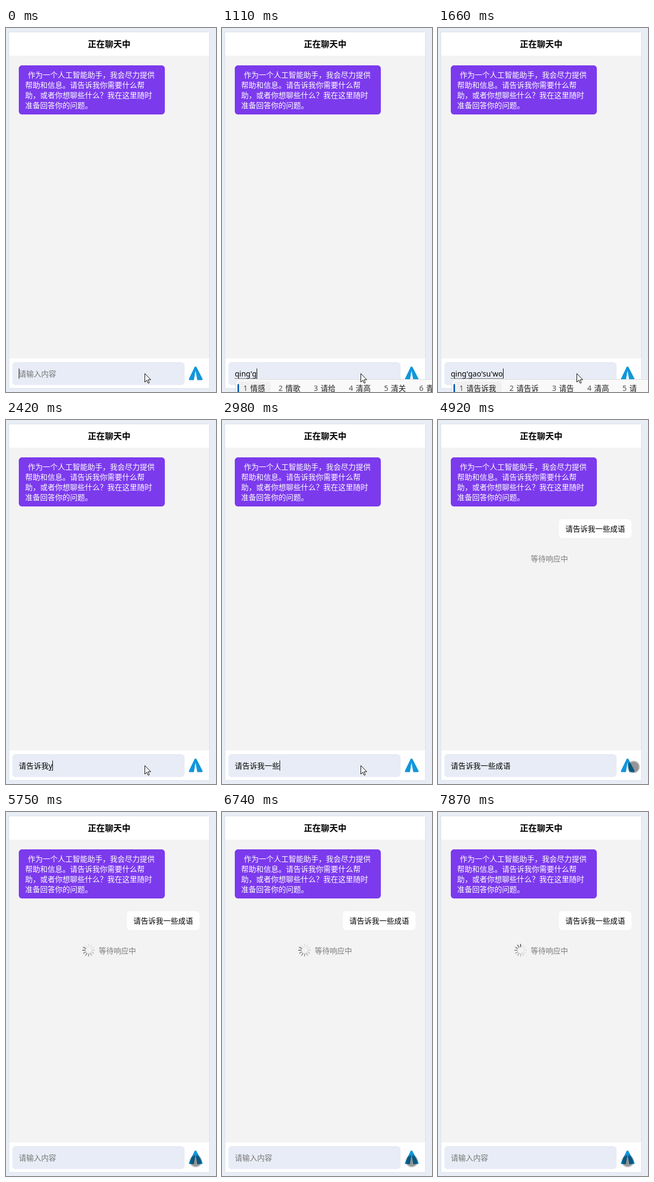
An HTML page that plays this animation: 394x682 px, repeating every 7.99 s.

```html
<!DOCTYPE html>
<html lang="zh-CN">
<head>
<meta charset="utf-8">
<title>正在聊天中</title>
<style>
html, body { margin: 0; width: 100%; height: 100%; overflow: hidden; background: #e8edf6; }
body { position: relative; font: 14px/20px "Noto Sans CJK SC", "Noto Sans CJK JP", "Noto Sans CJK", sans-serif; color: #000; }
#stage { position: absolute; left: 0; top: 0; width: 394px; height: 682px; overflow: hidden; background: #e8edf6; }
#stage > * { position: absolute; white-space: pre; box-sizing: border-box; }
#card { left: 5px; top: 7px; width: 377px; height: 669px; background: #f3f3f3; border: 1px solid #dbdfe8; }
#head { left: 6px; top: 8px; width: 375px; height: 44px; padding-top: 11px; background: #fff; font-size: 16px; font-weight: 700; text-align: center; }
#foot { left: 6px; top: 619px; width: 375px; height: 56px; background: #fff; }
#field { left: 12px; top: 626px; width: 323px; height: 43px; border-radius: 6px; background: #e8ecf6; }
#reply { left: 24px; top: 70px; width: 274px; height: 92px; padding: 8px 12px; border-radius: 6px; background: #7c3aed; color: #fff; font-weight: 500; line-height: 19px; text-indent: 5px; }
#sent { left: 227px; top: 186px; width: 136px; height: 35px; padding: 7px 12px; border-radius: 6px; background: #fff; }
#wait { left: 174px; top: 249px; color: #7d7d7d; }
#hint { left: 24px; top: 637px; color: #757575; }
#typed { left: 24px; top: 637px; }
#pinyin { font-family: "Noto Sans", sans-serif; background: repeating-linear-gradient(90deg, #000 0 1px, transparent 1px 2px) 0 100% / 100% 1px no-repeat; }
#caret { top: 638px; width: 1px; height: 19px; background: #000; }
#menu { top: 658px; width: 600px; height: 60px; padding: 3px 0 0 3px; border: 1px solid #dcdcdc; border-radius: 8px; background: #f9f9f9; color: #1b1b1b; }
#menu span { display: inline-block; height: 40px; margin-right: 4px; padding: 2px 10px 0 11px; border-radius: 4px; vertical-align: top; }
#menu span:first-of-type { background: #f0f0f0; }
#menu i { display: inline-block; width: 13px; color: #505050; font: 14px/20px "Noto Sans", sans-serif; }
#menu b { position: absolute; left: 3px; top: 8px; width: 3px; height: 16px; border-radius: 2px; background: #0f5fb8; }
#art { left: 0; top: 0; }
</style>
</head>
<body>
<div id="stage">
  <div id="card"></div>
  <div id="head">正在聊天中</div>
  <div id="reply">作为一个人工智能助手，我会尽力提供
帮助和信息。请告诉我你需要什么帮
助，或者你想聊些什么？我在这里随时
准备回答你的问题。</div>
  <div id="sent">请告诉我一些成语</div>
  <div id="wait">等待响应中</div>
  <div id="foot"></div>
  <div id="field"></div>
  <div id="hint">请输入内容</div>
  <div id="typed"><span id="done"></span><span id="pinyin"></span></div>
  <div id="caret"></div>
  <svg id="send" style="left:340px;top:630px" width="32" height="34" viewBox="340 630 32 34">
    <path d="M354.8 635 L344 657.6 Q343.6 659 345 659 H351.8 L354.8 642z M356.4 635 L368 657.6 Q368.4 659 367 659 H359.6 L356.4 642z"
      fill="#1296db" stroke="#1296db" stroke-width="1.6" stroke-linejoin="round"/>
  </svg>
  <div id="menu"></div>
  <svg id="art" width="394" height="682">
    <g id="spinner" stroke-width="2" stroke-linecap="round"></g>
    <path id="arrow" d="M260.5 647.5v16l3.7-3.6 2.4 5.6 2.4-1-2.4-5.5h5.1z" fill="#fff" stroke="#000"/>
    <g id="touch">
      <circle r="11.5" fill="#000" fill-opacity=".27"/>
      <circle r="9.5" fill="#000" fill-opacity=".2"/>
    </g>
  </svg>
</div>
<script>
const LOOP = 7990;
const el = id => document.getElementById(id);

// time, committed text, pinyin being composed, candidate words
const typing = [
  [0, '', '', ''],
  [280, '', 'q', ''],
  [540, '', 'qin', '亲 请 情 轻 青 琴 清 勤'],
  [690, '', 'qing', '请 情 轻 青 清 晴 庆 倾'],
  [1110, '', "qing'g", '情感 情歌 请给 清高 清关 青光'],
  [1360, '', "qing'gao", '请告 清高 情高 请 情 轻 青'],
  [1510, '', "qing'gao'su", '请告诉 请告 清高 请 情 轻'],
  [1660, '', "qing'gao'su'wo", '请告诉我 请告诉 请告 清高 请 情'],
  [2120, '请告诉我', '', ''],
  [2420, '请告诉我', 'y', ''],
  [2540, '请告诉我', "yi'x", '一些 一下 以下 一项 影响 一线'],
  [2690, '请告诉我', "yi'xie", '一些 一写 亦邪 一 以 已'],
  [2980, '请告诉我一些', '', ''],
  [3270, '请告诉我一些', 'c', ''],
  [3400, '请告诉我一些', "ch'y", '成语 次于 除以 抽烟 创业'],
  [3550, '请告诉我一些', "cheng'yu", '成语 程宇 成于 乘雨 城域'],
  [3690, '请告诉我一些成语', '', ''],
  [5040, '', '', '']
];

// time, x, y of the touch pointer
const touches = [
  [4530, 292, 654], [4650, 340, 652], [4800, 366, 651], [4920, 367, 650],
  [5040, 365, 651], [5190, 361, 652], [5340, 357, 654], [5480, 356, 654]
];

const at = (table, t) => table.filter(row => row[0] <= t).pop();
const show = (id, on) => el(id).style.visibility = on ? 'visible' : 'hidden';

const spokes = Array.from({ length: 12 }, (_, i) => {
  const line = document.createElementNS('http://www.w3.org/2000/svg', 'line');
  const attrs = { x1: 155, x2: 155, y1: 248, y2: 252.5, transform: `rotate(${i * 30} 155 259)` };
  for (const key in attrs) line.setAttribute(key, attrs[key]);
  el('spinner').append(line);
  return line;
});

let current;
function setTyping(row) {
  if (row === current) return;
  current = row;
  const [, done, pinyin, words] = row;
  el('done').textContent = done;
  el('pinyin').textContent = pinyin;
  el('caret').style.left = 24 + Math.round(el('typed').getBoundingClientRect().width) + 'px';
  el('menu').style.left = 25 + done.length * 14 + 'px';
  el('menu').innerHTML = '<b></b>' + words.split(' ')
    .map((word, i) => `<span><i>${i + 1}</i>${word}</span>`).join('');
  show('menu', words);
  show('hint', !done && !pinyin);
}

// One turn per second, in twelve hard steps
function spin(t) {
  const lead = Math.floor((t - 7860) / 1000 * 12);
  spokes.forEach((spoke, i) => {
    const age = ((lead - i) % 12 + 12) % 12;
    const grey = Math.min(226, 112 + age * 14);
    spoke.setAttribute('stroke', `rgb(${grey},${grey},${grey})`);
  });
}

function render(t) {
  setTyping(at(typing, t));
  show('caret', t < 4220 || (t >= 4800 && t < 4920));
  show('arrow', t < 4530);
  show('sent', t >= 4920);
  show('wait', t >= 4920);
  show('spinner', t >= 5190);
  spin(t);
  const touch = at(touches, t);
  show('touch', touch);
  if (touch) el('touch').setAttribute('transform', `translate(${touch[1]} ${touch[2]})`);
}

const start = performance.now();
function tick() {
  render((performance.now() - start) % LOOP);
  requestAnimationFrame(tick);
}
tick();
</script>
</body>
</html>
```
